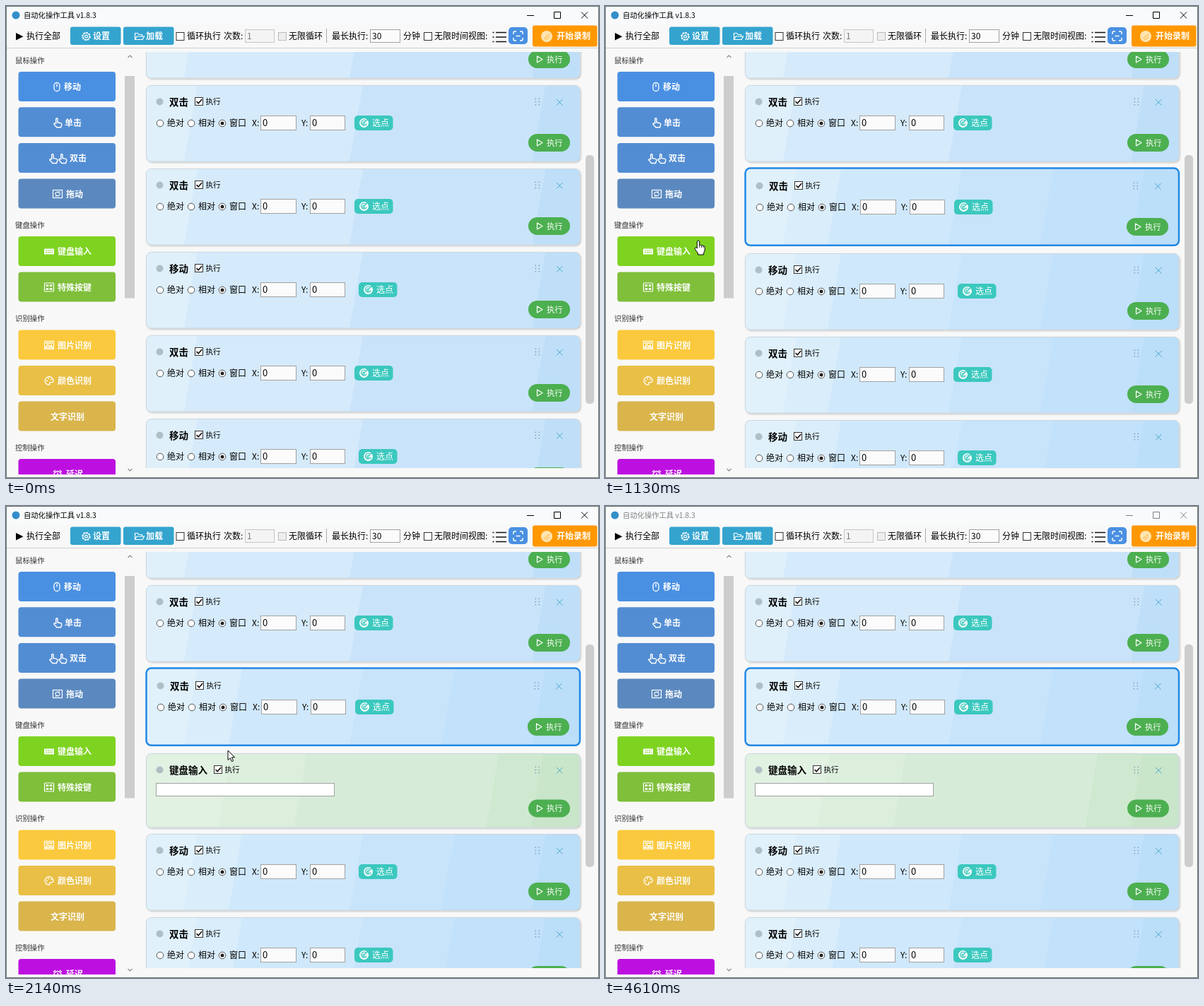
An HTML page for the animation above (4650 ms loop, 839x668 px).

```html
<!DOCTYPE html>
<html lang="zh-CN">
<head>
<meta charset="utf-8">
<title>Automation tool</title>
<style>
html, body { margin: 0; width: 100%; height: 100%; overflow: hidden; background: #f8f8f8; }
svg { display: block; width: 839px; height: 668px; }
text { font-family: "Noto Sans CJK SC", "Noto Sans CJK JP", "Noto Sans CJK", sans-serif; white-space: pre; }
</style>
</head>
<body>
<svg id="stage" viewBox="0 0 839 668" xmlns="http://www.w3.org/2000/svg"></svg>
<script>
const LOOP = 4650, TICK = 40;
const stage = document.getElementById('stage');
const $ = id => document.getElementById(id);

// ---- drawing helpers ----
const box = (x, y, w, h, fill, r = 0, more = '') =>
  `<rect x="${x}" y="${y}" width="${w}" height="${h}" rx="${r}" fill="${fill}" ${more}/>`;
const line = (d, color, w = 1, more = '') =>
  `<path d="${d}" fill="none" stroke="${color}" stroke-width="${w}" ${more}/>`;
const disc = (x, y, r, fill, more = '') => `<circle cx="${x}" cy="${y}" r="${r}" fill="${fill}" ${more}/>`;
// text placed by its left edge and vertical centre
const label = (x, cy, s, size = 12, fill = '#000', weight = 400) =>
  `<text x="${x}" y="${(cy + size * 0.37).toFixed(1)}" font-size="${size}" font-weight="${weight}" fill="${fill}">${s}</text>`;
const check = (x, y, s, on, stroke = '#333', fill = '#fff') =>
  box(x + .5, y + .5, s - 1, s - 1, fill, 0, `stroke="${stroke}"`) +
  (on ? line(`M${x + 2.5} ${y + 6}l2.7 2.8 5-5.8`, '#111', 1.6) : '');
const radio = (x, y, on) =>
  disc(x, y, 4.8, '#fff', 'stroke="#444" stroke-width=".9"') + (on ? disc(x, y, 2.5, '#222') : '');
const field = (x, y, w, h, s = '', size = 13, fill = '#fbfbfb', color = '#000', edge = '#a2a2a2') =>
  box(x + .5, y + .5, w - 1, h - 1, fill, 0, `stroke="${edge}"`) + label(x + 3, y + h / 2, s, size, color);

const bands = (id, h, list) => {
  const stops = list.map(([at, c], i) => {
    const end = i + 1 < list.length ? list[i + 1][0] : 1;
    return `<stop offset="${at}" stop-color="${c}"/><stop offset="${end}" stop-color="${c}"/>`;
  }).join('');
  return `<linearGradient id="${id}" gradientUnits="userSpaceOnUse" x1="198" y1="0" x2="812" y2="${h}">${stops}</linearGradient>`;
};

// ---- small icons, drawn around (x, y) ----
const at = (x, y, s) => `<g transform="translate(${x} ${y})">${s}</g>`;
const W = '#fff';
const finger = line('M-2.300 1.200V-5.200q1.200-1.600 2.300 0V0l4.600.9q1.600.5 1.200 2.300L4.600 7H-1.200L-5.200 2.300q0-1.700 2.900-1.100z', W, 1.4);
const icons = {
  mouse: box(-4, -6, 8, 12, 'none', 4, 'stroke="#fff" stroke-width="1.3"') + line('M0-4V0', W, 1.4),
  tap: finger,
  taps: finger + at(13, 0, finger),
  drag: box(-6.5, -5.5, 13, 11, 'none', 0, 'stroke="#fff" stroke-width="1.2"') +
    line('M-3 1A3 3 0 0 1 2-2M3-1A3 3 0 0 1-2 2M0-2h2.5v-2M0 2h-2.5v2', W, 1.1),
  keys: box(-7, -4, 14, 8, W, 1) + line('M-5-1.5H5M-5 1H5', '#7ed321', 1, 'stroke-dasharray="2 .8"'),
  pad: box(-6.5, -6, 13, 12, 'none', 1, 'stroke="#fff" stroke-width="1.2"') +
    [[-4.3, -3.8], [.8, -3.8], [-4.3, 1], [.8, 1]].map(p => box(p[0], p[1], 3.5, 2.8, W)).join(''),
  image: box(-6.5, -5.5, 13, 11, 'none', 0, 'stroke="#fff" stroke-width="1.2"') +
    line('M-5 3.5L-2-1L1 2L3 0L5 3.5zM-5-3H5', W, 1.4),
  palette: line('M-2 5.3A6 5.7 0 1 1 6 1Q5 3 1.5 2Q0 3 1 5Q0 6-2 5.3z', W, 1.3) +
    disc(-3, 0, 1, W) + disc(-1, -3, 1, W) + disc(3, -2, 1, W),
  clock: disc(0, 1, 5, 'none', 'stroke="#fff" stroke-width="1.3"') + line('M-6-3l3-2.5M6-3L3-5.5M0-2v3h2.5', W, 1.3),
  gear: disc(0, 0, 5.4, 'none', 'stroke="#fff" stroke-width="1.6" stroke-dasharray="2.6 1.5"') +
    disc(0, 0, 4.6, 'none', 'stroke="#fff"') + disc(0, 0, 1.9, 'none', 'stroke="#fff" stroke-width="1.2"'),
  folder: line('M-6 4.5V-4.5h4l1.5 2H4V0M-6 4.5L-3.5 0H7L4.5 4.5z', W, 1.2),
  target: disc(0, 0, 6.5, W) + line('M3-3A4 4 0 1 0 3.8 1M1-1A1.6 1.6 0 1 0 1.4.8M0 0L5-5', '#3bc7bd', 1.3)
};

// ---- window chrome ----
function titleBar() {
  return box(0, 0, 839, 26, '#f8fafb') + disc(14, 13, 5.5, '#338fc9') +
    `<g id="caption">${label(25, 13, '自动化操作工具 v1.8.3', 10.3)}` +
    line('M737 13.5h10M775.5 8.5h9v9h-9zM814 8.5l9 9M823 8.5l-9 9', '#000', 1) + '</g>';
}

function toolbar() {
  const blue = (x, icon, s) => box(x, 29.5, 71.5, 25.5, '#34a4ce', 3) +
    at(x + 22.5, 43, icons[icon]) + label(x + 32, 43, s, 12, W, 700);
  return '<path d="M14 38l10.500 5.200-10.500 5.200z"/>' + label(29, 43, '执行全部') +
    blue(91, 'gear', '设置') + blue(166, 'folder', '加载') +
    check(240.5, 37, 12) + label(256, 43, '循环执行') + label(308, 43, '次数:') +
    field(338, 33, 42, 19, '1', 12, '#f4f4f4', '#777', '#c6c6c6') +
    check(385, 37, 12, false, '#bbb', '#eee') + label(400, 43, '无限循环') +
    line('M453.5 32v20', '#aaa') + label(461, 43, '最长执行:') +
    field(515, 33, 43, 19, '30', 12) + label(562, 43, '分钟') +
    check(591, 37, 12) + label(606, 43, '无限时间视图:') +
    line('M693 37.500h15M693 44h15M693 50.500h15', '#111', 1.7) +
    line('M688.500 37.500h2M688.500 44h2M688.500 50.500h2', '#111', 1.7) +
    box(711, 30, 27, 24, '#4a90e2', 5) +
    line('M718 40v-2.500q0-1.500 1.500-1.500h2.500M727 36h2.500q1.500 0 1.500 1.500v2.500M731 45v2.500q0 1.500-1.500 1.500h-2.500M722 49h-2.500q-1.500 0-1.500-1.500v-2.500M721.500 42.500h6', W, 1.5) +
    box(745, 27.5, 91.5, 30, '#ff9800', 3) + disc(765, 43, 8, '#ffe5b0') +
    line('M761 46l8-6M763 48l6-4', '#ffbe58', 1.3) + label(779, 43, '开始录制', 12, W, 700) +
    line('M0 59.500h839', '#cfcfcf');
}

function sidebar() {
  const heads = [[77, '鼠标操作'], [310.5, '键盘操作'], [442.5, '识别操作'], [625.5, '控制操作']];
  const keys = [
    [93, '#4a90e2', 'mouse', 72, 82, '移动'], [143.3, '#528dd3', 'tap', 73, 83, '单击'],
    [194, '#528dd3', 'taps', 67, 90, '双击'], [244.5, '#5b89bf', 'drag', 73, 85, '拖动'],
    [326, '#7ed321', 'keys', 61, 73, '键盘输入'], [376.5, '#7fbf3a', 'pad', 61, 73, '特殊按键'],
    [458.5, '#fbc93d', 'image', 61, 73, '图片识别'], [509, '#e9bf45', 'palette', 61, 73, '颜色识别'],
    [559.5, '#d9b54c', '', 0, 63, '文字识别'], [641, '#bd10e0', 'clock', 73, 85, '延迟']
  ];
  return '<g clip-path="url(#sideClip)">' +
    heads.map(h => label(13, h[0], h[1], 10.4, '#333')).join('') +
    keys.map(([y, c, icon, ix, tx, s]) => box(17.5, y, 137.5, 42, c, 4) +
      (icon ? at(ix, y + 21.5, icons[icon]) : '') + label(tx, y + 21.8, s, 12, W, 700)).join('') + '</g>' +
    box(168, 99, 14, 314.5, '#cdcdcd') +
    line('M172.500 73l3-3 3 3M172.500 655l3 3 3-3', '#888', 1.1);
}

// ---- list cards; local y starts at the card's top ----
function card(id, title, green) {
  const h = green ? 105 : 108, run = green ? 78 : 81.4;
  const tick = green ? 294 : 267, pick = title === '移动' ? 499 : 493;
  const body = green ? field(212, 42, 253, 19, '', 12, '#fff') :
    [[218, '绝对'], [262, '相对'], [306, '窗口']].map(([x, s], i) => radio(x, 54, i === 2) + label(x + 10, 54, s)).join('') +
    label(348, 54, 'X:') + field(360, 43, 51, 21, '0') + label(418, 54, 'Y:') + field(430, 43, 50, 21, '0') +
    box(pick, 43, 54.5, 21, '#3bc8be', 5) + at(pick + 13.5, 53.5, icons.target) + label(pick + 25, 54, '选点', 12, W);
  let grip = '';
  for (let i = 0; i < 6; i++) grip += box(748.5 + i % 2 * 5, 18.5 + (i >> 1) * 4.2, 1.6, 1.6, '#86a4b8');
  return `<g id="${id}">` +
    box(198.5, .5, 613.5, h - .5, green ? 'url(#leaf)' : 'url(#skyA)', 7,
      `id="${id}Bg" stroke="#cbd8e0" filter="url(#shade)"`) +
    `<g id="${id}L">` + disc(217.5, 23.5, 5, '#b0bec5') + label(231, 24.3, title, 13.5, '#000', 700) +
    check(tick, 17, 12, true) + label(tick + 15.5, 23.3, '执行', 10.6) + body + `</g><g id="${id}R">` + grip +
    line('M779 20l8.500 8.500M787.500 20l-8.500 8.500', '#49a8c9', 1) +
    box(739, run - 12.5, 59, 25, '#4caf50', 12.5) +
    line(`M751.5 ${run - 4.5}v9l7.500-4.500z`, W, 1.2, 'stroke-linejoin="round"') +
    label(765, run, '执行', 11.2, W, 500) + '</g></g>';
}

const arrow = '<path d="M0 0V13.500L3.200 10.600 5.400 15.700 7.600 14.700 5.400 9.700H9.600z" fill="#fff" stroke="#000"/>';
const hand = '<path d="M-1.700 11V1Q0-1.200 1.700 1V6.500Q3.200 5.300 4.500 7Q6 6 7 7.600Q8.800 7 9.200 9V14L7.600 17.500V20H-.5V18L-4.600 12.300Q-5.400 10.300-3.700 9.800Q-2.600 9.800-1.700 11z" fill="#fff" stroke="#000"/>' +
  line('M1.700 6.500V10M4.500 7V10M7 7.600V10', '#000', .8);

stage.innerHTML = '<defs>' +
  bands('skyA', 108, [[0, '#dff0fb'], [.115, '#d5eafb'], [.485, '#c9e4fa'], [.893, '#bfdff9']]) +
  bands('skyB', 108, [[0, '#e0f1fb'], [.115, '#d9edfb'], [.215, '#d0e8fb'], [.485, '#c7e4fb'], [.69, '#c2e1fb'], [.893, '#bbdef9']]) +
  bands('leaf', 105, [[0, '#e1f1e2'], [.19, '#dcefdd'], [.36, '#d6ecd8'], [.79, '#cee9cf'], [.89, '#c9e6ca']]) +
  '<filter id="shade" x="-3%" y="-10%" width="106%" height="125%"><feDropShadow dx="1" dy="1.2" stdDeviation="1.1" flood-color="#000" flood-opacity=".24"/></filter>' +
  '<clipPath id="sideClip"><rect x="1" y="61" width="186" height="602"/></clipPath>' +
  '<clipPath id="listClip"><rect x="188" y="65" width="630" height="589"/></clipPath></defs>' +
  box(0, 0, 839, 668, '#f8f8f8') + titleBar() + toolbar() + sidebar() +
  '<g clip-path="url(#listClip)">' +
  ['双击', '双击', '双击', '移动', '双击', '移动'].map((s, i) => card('c' + i, s)).join('') +
  card('g', '键盘输入', true) +
  box(197, 345, 616, 2.6, '#2e8fe6', 0, 'id="drop"') + '</g>' +
  box(820, 211, 12, 352, '#cdcdcd', 5, 'id="thumb"') +
  line('M.5 .5h838v667h-838z', '#66736e') +
  `<g id="cursor"><g id="hand">${hand}</g><g id="arrow">${arrow}</g></g>`;

// ---- motion ----
const ENTER = 290, PICK = 850, DRAG = 1490, DROP = 2140, LEAVE = 3030, BLUR = 4610;
const route = [
  [290, 396, 528], [370, 352, 440], [490, 304, 342], [650, 286, 311], [930, 286, 311],
  [1130, 132, 332], [1250, 108, 333], [1370, 102, 328], [1450, 102, 328], [1570, 160, 336],
  [1690, 268, 353], [1770, 314, 346], [2550, 314, 346], [2710, 174, 346], [2790, 160, 348],
  [2830, 127, 364], [2990, 36, 554]
];
const show = (id, on) => $(id).setAttribute('display', on ? 'inline' : 'none');
const move = (id, x, y) => $(id).setAttribute('transform', `translate(${x.toFixed(1)} ${y.toFixed(1)})`);
const set = (id, o) => { for (const k in o) $(id).setAttribute(k, o[k]); };
const steps = ms => Math.floor(ms / TICK) * TICK;   // the screen updates every 40 ms

function spot(t) {
  const i = route.findIndex(p => p[0] > t);
  if (i < 0) return route[route.length - 1].slice(1);
  if (!i) return route[0].slice(1);
  const a = route[i - 1], b = route[i], k = steps(t - a[0]) / (b[0] - a[0]);
  return [a[1] + (b[1] - a[1]) * k, a[2] + (b[2] - a[2]) * k];
}

function render(t) {
  const picked = t >= PICK, dropped = t >= DROP;
  const tint = [1e9, 1e9, 450, 370, ENTER, PICK];   // when each card repaints
  for (let i = 0; i < 6; i++) {
    const shift = i < 3 || !picked ? 0 : dropped ? 116 : 2;
    move('c' + i, 0, -6 + 118 * i + shift);
    $('c' + i + 'Bg').setAttribute('fill', t >= tint[i] ? 'url(#skyB)' : 'url(#skyA)');
  }
  move('g', 0, 350);
  show('g', dropped);

  // selected card: outline and a short fade-in
  set('c2Bg', picked
    ? { y: -.4, stroke: '#2288e5', 'stroke-width': 2.5, height: 109.2, filter: 'none' }
    : { y: .5, stroke: '#cbd8e0', 'stroke-width': 1, height: 107.5, filter: 'url(#shade)' });
  const fade = Math.min(1, steps(t - PICK) / 240);
  $('c2').setAttribute('opacity', picked ? .88 + .12 * fade : 1);
  move('c2L', picked ? 1 : 0, picked ? 1 : 0);
  move('c2R', picked ? -1 : 0, picked ? 1 : 0);

  set('thumb', dropped ? { y: 196, height: 315 } : { y: 211, height: 352 });
  const [x, y] = spot(t);
  show('drop', t >= DRAG && !dropped && x > 198);
  show('cursor', t >= ENTER && t < LEAVE);
  show('hand', t < DRAG);
  show('arrow', t >= DRAG);
  move('cursor', x, y);
  $('caption').setAttribute('opacity', t >= BLUR ? .48 : 1);
}

const start = performance.now();
function frame() {
  render((performance.now() - start) % LOOP);
  requestAnimationFrame(frame);
}
frame();
</script>
</body>
</html>
```
